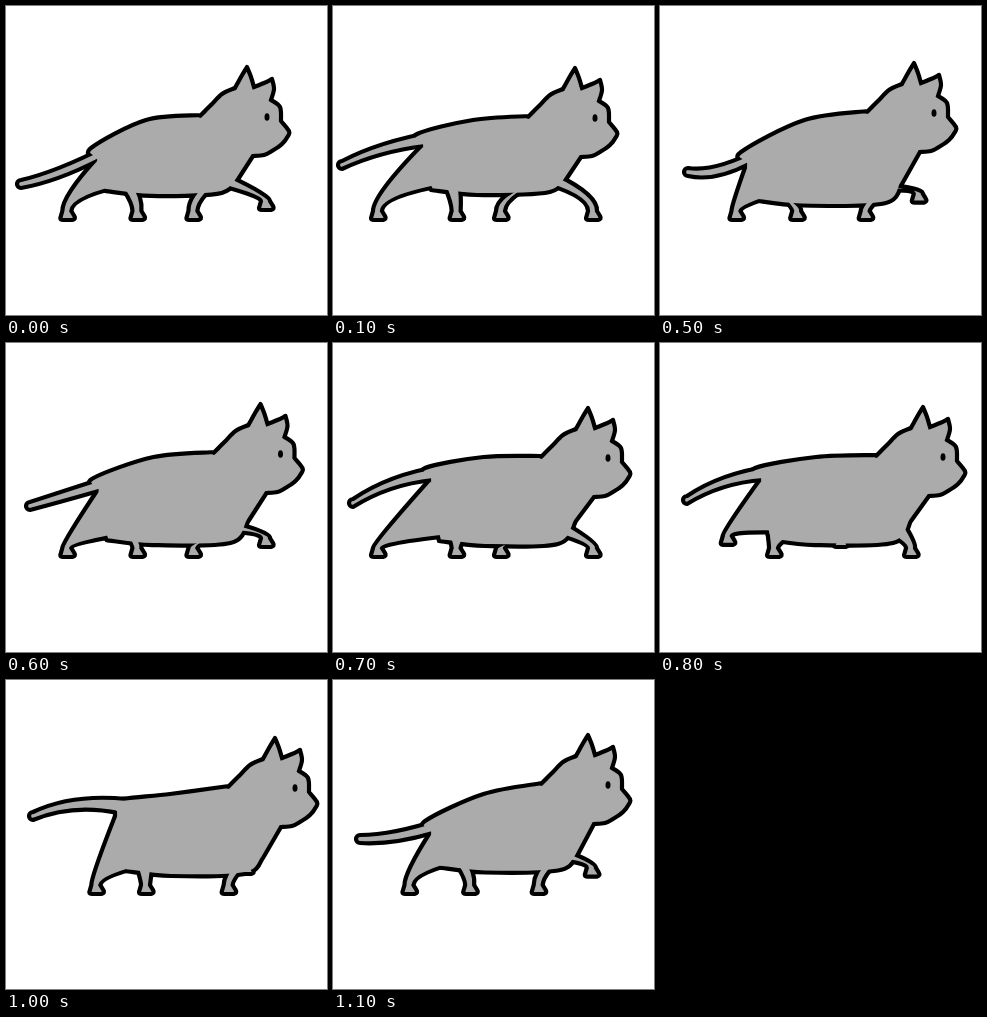
Recreate the animation shown at these times as an HTML page. Size 321x309 px, loop 1.2 s.

```html
<!DOCTYPE html>
<html lang="en">
<head>
<meta charset="utf-8">
<title>Walking cat</title>
<style>
  html, body { margin: 0; width: 100%; height: 100%; overflow: hidden; background: #fff; }
  svg { display: block; width: 100%; height: 100%; }
</style>
</head>
<body>
<svg viewBox="0 0 321 309">
  <defs id="defs"></defs>
  <g id="ink" fill="#000" stroke="#000" stroke-width="4.2" stroke-linejoin="round"></g>
  <g id="fur" fill="#ababab"></g>
  <ellipse id="eye" rx="2.5" ry="3.8"/>
</svg>
<script>
const STEP = 100, STEPS = 12, GROUND = 214;

// Key points of the sway: step, nose x y, tail root x y, tail tip x y.
const sway = [
  [0, 283, 125, 85, 148, 15, 178],
  [1, 284, 126, 84, 134, 9, 159],
  [3, 287, 122, 88, 146, 23, 174],
  [5, 296, 121, 81, 152, 28, 166],
  [7, 297, 129, 92, 131, 20, 160],
  [8, 305, 128, 95, 131, 27, 157],
  [10, 311, 122, 105, 127, 27, 136],
  [11, 297, 119, 92, 147, 27, 159]
];

// Head outline from nape to chin, relative to the nose; "/" marks a corner.
const head = `-88,-16 -78,-26 -67,-37 -54,-43 / -48,-54 -42,-64 / -38,-54 -35,-44
  / -25,-48 -17,-52 / -15,-42 -18,-31 / -9,-24 -8,-10 / 0,0 -1,5 -7,13 -17,20 -25,24 -36,25`
  .split("/").map(run => run.trim().split(/\s+/).map(p => p.split(",").map(Number)));

const mod = (a, n) => (a % n + n) % n;
const mix = (a, b, t) => a + (b - a) * t;
const smooth = t => t * t * (3 - 2 * t);

function swayAt(step) {
  const i = sway.findLastIndex(key => key[0] <= step);
  const a = sway[i], b = sway[i + 1] || a;
  const t = a === b ? 0 : (step - a[0]) / (b[0] - a[0]);
  const [, nx, ny, rx, ry, tx, ty] = a.map((v, k) => mix(v, b[k], t));
  const belly = 196 - 7 * Math.cos((step - 1) / STEPS * 2 * Math.PI);
  return { nose: [nx, ny], root: [rx, ry], tip: [tx, ty], belly };
}

// A foot drifts back along the ground, then swings forward.
function hindFoot(step) {
  const u = mod(step + 2, STEPS);
  if (u <= 9) return [140 - 95 * (u / 9) ** 1.6, GROUND];
  const s = (u - 9) / 3;
  return [45 + 95 * s ** 1.3, GROUND - 14 * Math.sin(Math.PI * s)];
}

function frontFoot(step) {
  const u = mod(step - 7, STEPS);
  if (u <= 6) return [260 - 92 * (u / 6) ** 1.3, GROUND];
  const s = (u - 6) / 6;
  return [168 + 92 * smooth(Math.min(1, 1.4 * s)), GROUND - 20 * Math.sin(Math.PI * s)];
}

// Catmull-Rom spline through the points, as Bézier segments.
function curve(points) {
  return points.slice(1).map((c, i) => {
    const b = points[i], a = points[i - 1] || b, e = points[i + 2] || c;
    const out = b.map((v, k) => v + (c[k] - a[k]) / 6);
    const into = c.map((v, k) => v - (e[k] - b[k]) / 6);
    return `C${out} ${into} ${c}`;
  }).join("");
}

function outline(runs) {
  let last = runs[0][0];
  return `M${last}` + runs.map(run => {
    const d = curve([last, ...run]);
    last = run[run.length - 1];
    return d;
  }).join("") + "Z";
}

function torso({ nose: [nx, ny], root: [rx, ry], belly }) {
  const face = head.map(run => run.map(([x, y]) => [x + nx, y + ny]));
  const nape = face[0][0];
  return outline([
    ...face,
    [[nx - 54, 178]],
    [[nx - 72, belly - 2], [rx + 60, belly], [rx + 14, belly - 5]],
    [[rx + 5, ry + 28], [rx + 4, ry + 5]],
    [[rx, ry - 6], [(rx + nape[0]) / 2, 114], nape]
  ]);
}

function tail({ root: [rx, ry], tip: [tx, ty] }) {
  const x = (rx + tx) / 2, y = (ry + ty) / 2 + (ry - 140);
  return `M${rx + 16},${ry - 8}Q${x},${y - 5} ${tx},${ty - 4}A4 4 0 0 0 ${tx},${ty + 4}
    Q${x},${y + 5} ${rx + 8},${ry + 6}L${rx + 20},${ry + 12}Z`;
}

function leg(back, front, [x, y], belly) {
  const bend = Math.min(belly, y - 14);
  return `M${back}Q${x - 5},${bend} ${x - 5},${y - 9}L${x - 7},${y - 2}Q${x - 7},${y} ${x - 4},${y}
    L${x + 5},${y}Q${x + 9},${y - 1} ${x + 7},${y - 4}L${x + 4},${y - 9}Q${x + 5},${bend} ${front}Z`;
}

function cat(step) {
  const pose = swayAt(step), { nose, root: [rx, ry], belly } = pose;
  const shoulder = nose[0] - 68;
  const hind = foot => leg([rx + 6, ry + 4], [rx + 42, belly - 12], foot, belly);
  const front = foot => leg([shoulder - 14, belly - 14], [shoulder + 8, belly - 20], foot, belly);
  const paths = [
    torso(pose), tail(pose),
    hind(hindFoot(step)), hind(hindFoot(step + 6)),
    front(frontFoot(step)), front(frontFoot(step + 6))
  ];
  return { paths, eye: [nose[0] - 22, nose[1] - 14] };
}

const [defs, ink, fur, eye] = ["defs", "ink", "fur", "eye"].map(id => document.getElementById(id));
const first = cat(0).paths;

// Each part is inked, then filled inside its own line, so that joints show no seam.
defs.innerHTML = first.map((_, i) => `<path id="part${i}"/>
  <mask id="inside${i}" maskUnits="userSpaceOnUse" x="0" y="0" width="321" height="309">
    <use href="#part${i}" fill="#fff" stroke="#000" stroke-width="4.2"/></mask>`).join("");
ink.innerHTML = first.map((_, i) => `<use href="#part${i}"/>`).join("");
fur.innerHTML = first.map((_, i) => `<rect width="321" height="309" mask="url(#inside${i})"/>`).join("");
const parts = first.map((_, i) => document.getElementById("part" + i));

function draw(time) {
  const { paths, eye: [x, y] } = cat(Math.floor(time / STEP) % STEPS);
  parts.forEach((part, i) => part.setAttribute("d", paths[i]));
  eye.setAttribute("cx", x);
  eye.setAttribute("cy", y);
}

let start;
function tick(now) {
  start ??= now;
  draw(now - start);
  requestAnimationFrame(tick);
}
draw(0);
requestAnimationFrame(tick);
</script>
</body>
</html>
```
